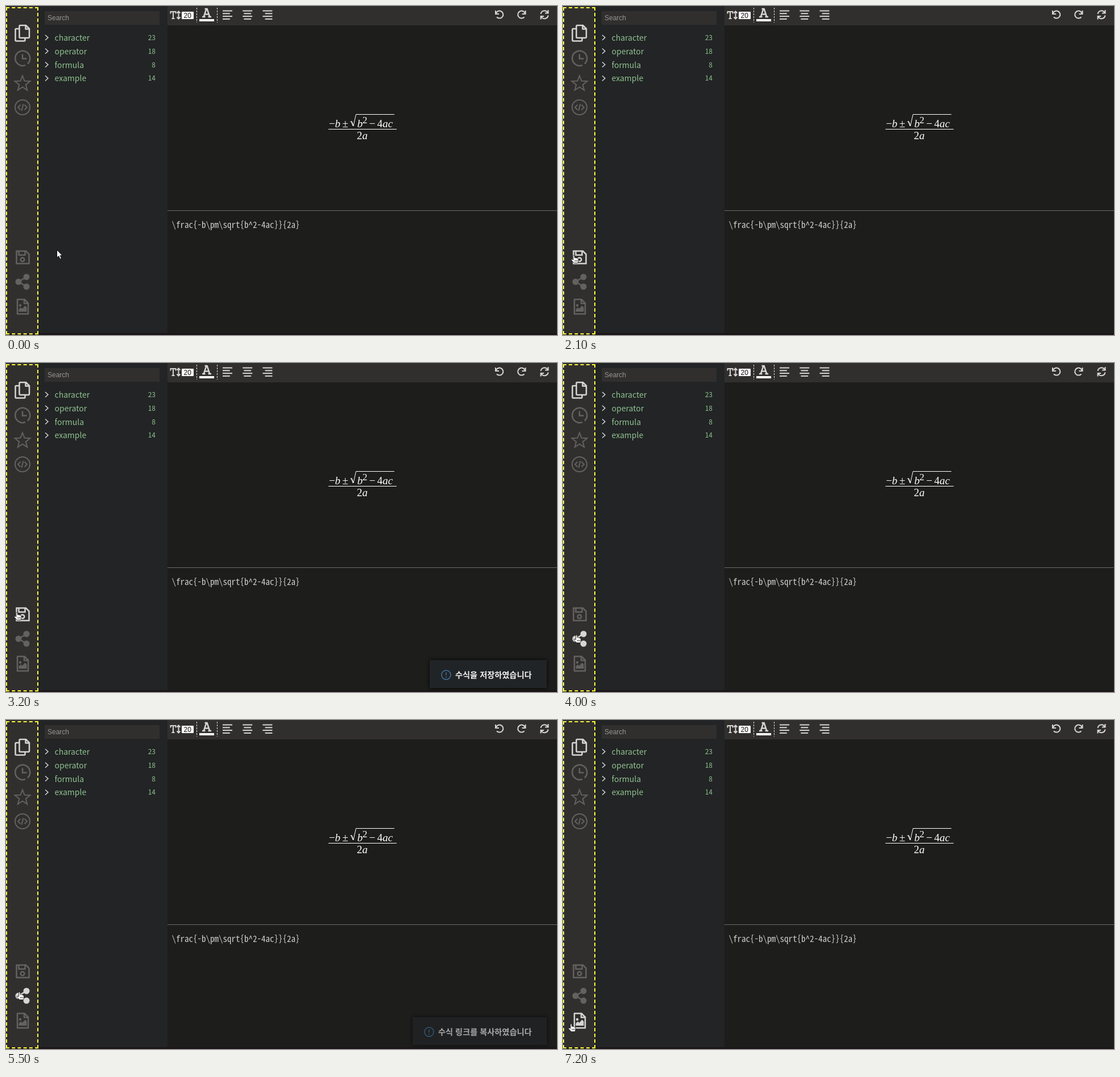
These frames come from a looping animation (969x578 px, 8 s). An HTML page:

```html
<!DOCTYPE html>
<html lang="ko">
<head>
<meta charset="utf-8">
<title>Formula editor</title>
<style>
  html, body { margin: 0; width: 100%; height: 100%; overflow: hidden; background: #1d1d1b; }
  svg { position: absolute; left: 0; top: 0; display: block; }
  .frame {
    position: absolute; left: 0; top: 2px; width: 57px; height: 575px;
    box-sizing: border-box; border: 2px dashed #ffff35;
  }
  .cjk { font-family: 'Noto Sans CJK KR', 'Noto Sans CJK JP', 'Noto Sans', sans-serif; }
  .arial { font: 12px 'Liberation Sans', sans-serif; }
  .code { font: 15px 'Noto Sans Mono CJK KR', 'Noto Sans Mono CJK JP', 'Noto Sans Mono', monospace; fill: #d0d0ce; white-space: pre; }
  .math text { font: 19px 'Liberation Serif', serif; fill: #fff; }
  .math .i { font-style: italic; }
  .line { fill: none; stroke: currentColor; stroke-width: 2.5; }
  .thin { stroke-width: 2; }
  .fill { fill: currentColor; }
  .dim { color: #64615f; }
  .on { color: #d6d5d4; }
  .body { fill: #212427; filter: drop-shadow(0 0 3px rgba(0, 0, 0, .95)); }
  .msg { font-size: 14.2px; font-weight: 700; fill: #f0f0f0; }
</style>
</head>
<body>
<svg width="969" height="578" viewBox="0 0 969 578">
  <rect width="969" height="578" fill="#1d1d1b"/>
  <rect x="57" width="227" height="578" fill="#222425"/>
  <rect width="57" height="578" fill="#312f2e"/>
  <rect x="284" width="685" height="34" fill="#312f2e"/>
  <rect x="284" y="359" width="685" height="1" fill="#6b6a68"/>
  <rect y="575" width="969" height="3" fill="#1c1418"/>

  <rect x="68" y="9" width="202" height="24" fill="#312f2e"/>
  <text class="arial" x="73" y="25" fill="#979593">Search</text>
  <g id="list" class="cjk" fill="#90c190"></g>

  <g class="on">
    <path class="line thin" d="M289.5 13.5V10h9v3.500M294 10v12M291.5 22h5M303.5 11v10M300.5 12.5l3-3 3 3M300.5 19.5l3 3 3-3"/>
    <rect x="309" y="10" width="21" height="13" rx="1" fill="#fff"/>
    <text class="arial" x="312.5" y="21" fill="#111">20</text>
    <path d="M335.5 3v26M371.5 3v26" stroke="#e8e8e8" stroke-dasharray="3 2"/>
    <path class="line" d="M347.8 19L352.4 5h1.200L358.200 19M349.5 14.500h7M345 19h5.500M355.500 19h5.500M349.500 5h4"/>
    <rect x="340" y="23" width="26" height="4" fill="#fff"/>
    <g id="align" class="fill"></g>
    <g class="line thin">
      <path d="M861 8v6h6M861.5 13.5a6.5 6.5 0 1 1 1.5 6"/>
      <path d="M913.5 8v6h-6M913 13.5a6.5 6.5 0 1 0-1.5 6"/>
      <path d="M940.5 14a6.5 6.5 0 0 1 12-2.5M953.5 7v5.5h-5.5M953.5 16.5a6.5 6.5 0 0 1-12 2.5M940.5 23.5v-5.5h5.5"/>
    </g>
  </g>

  <g class="math">
    <text x="568" y="213">−</text>
    <text class="i" x="578.5" y="213">b</text>
    <text x="591.5" y="213">±</text>
    <path d="M605.5 203.5l2-1 3.3 8.5 4.700-20.500H683" fill="none" stroke="#fff"/>
    <path d="M607.7 203l2.900 7.500" stroke="#fff" stroke-width="1.6"/>
    <text class="i" x="617.8" y="213">b</text>
    <text x="626.8" y="206" style="font-size:17.5px">2</text>
    <text x="638.8" y="213">−</text>
    <text x="652.8" y="213">4<tspan class="i">ac</tspan></text>
    <rect x="567" y="216" width="120" height="1" fill="#fff"/>
    <text x="617" y="234">2<tspan class="i">a</tspan></text>
  </g>
  <text class="code" x="291.5" y="390">\frac{-b\pm\sqrt{b^2-4ac}}{2a}</text>

  <path class="line on" stroke-linejoin="round" d="M25 34h10l6 6v14.5a1.5 1.5 0 0 1-1.5 1.5H25a1.5 1.5 0 0 1-1.5-1.5v-19A1.5 1.5 0 0 1 25 34zM34.5 34v6.5H41M23.5 40H18a1.5 1.5 0 0 0-1.5 1.5V60a1.5 1.5 0 0 0 1.5 1.5h14a1.5 1.5 0 0 0 1.5-1.5v-4"/>
  <g class="dim">
    <path class="line" d="M38 101.5a13 13 0 1 0-4 2.5M38 101.500a13 13 0 0 0 3-4M29 84.5v8h7.5"/>
    <path id="star" class="line thin"/>
    <circle class="line thin" cx="29" cy="178" r="13"/>
    <path class="line thin" d="M25.5 173.5l-4.5 4.5 4.5 4.5M32.5 173.5l4.5 4.5-4.5 4.5M30.5 172l-3 12"/>
  </g>
  <g id="save" class="dim">
    <path class="line" d="M18.5 430.5H35l5.5 5.5v16.5h-22zM22.5 431v6.5h11V431"/>
    <circle class="line" cx="29" cy="445.5" r="3.3"/>
  </g>
  <g id="share" class="dim">
    <path class="line" d="M36 476l-14 8.500 14 8.500"/>
    <g class="fill">
      <circle cx="36" cy="476" r="5.5"/><circle cx="22" cy="484.5" r="5.5"/><circle cx="36" cy="493" r="5.5"/>
    </g>
  </g>
  <g id="image" class="dim">
    <path class="line" stroke-linejoin="round" d="M20 515.5h12.5l6.5 6.5v19H20zM32 515.5v7h7"/>
    <path class="fill" d="M22.5 537v-4l3.5-3.5 2.5 2.5 5-5.5 3 3v7.500z"/>
    <circle class="fill" cx="25" cy="526" r="2.2"/>
  </g>
</svg>
<div class="frame"></div>
<svg width="969" height="578" viewBox="0 0 969 578">
  <g id="toasts" class="cjk"></g>
  <g id="tips" class="cjk"></g>
  <path id="arrow" d="M.5 .5V14l3.2-2.8 2.3 5.3 2.5-1.1-2.3-5.1H10z" fill="#fff" stroke="#111"/>
  <path id="hand" d="M4 9V2Q4 .7 5.2 .7T6.5 2V5.2Q8.5 4.6 9 5.7 10.8 5.3 11.2 6.5 13 6.3 13 8V11Q13 12.5 12 14.5H5.5L1 10Q.2 8.7 1.3 8 2.5 7.7 4 9zM7 9.500v2.500M9 9.500v2.500M11 9.500v2.500" fill="#fff" stroke="#111" stroke-width=".8"/>
</svg>
<script>
  const LOOP = 8000, STEP = 100;
  const $ = id => document.getElementById(id);

  // static repeats
  $('list').innerHTML = [['character', 23], ['operator', 18], ['formula', 8], ['example', 14]]
    .map(([name, count], i) => {
      const y = 61 + i * 23.8;
      return `<path d="M69 ${y - 10}l5 4.5-5 4.5" fill="none" stroke="#dcdcdc" stroke-width="1.4"/>
        <text x="85.5" y="${y}" font-size="14">${name}</text>
        <text x="263" y="${y - 1}" font-size="12" text-anchor="end">${count}</text>`;
    }).join('');

  $('align').innerHTML = [0, .5, 1].map((side, n) =>
    [17, 12.8, 17, 12.8].map((w, i) =>
      `<rect x="${381 + n * 35.2 + (17 - w) * side}" y="${7.5 + i * 4.8}" width="${w}" height="2"/>`
    ).join('')).join('');

  const points = Array.from({ length: 10 }, (_, i) => {
    const a = i * Math.PI / 5, r = i % 2 ? 6 : 14;
    return `${29 + r * Math.sin(a)} ${136.5 - r * Math.cos(a)}`;
  });
  $('star').setAttribute('d', `M${points.join('L')}z`);

  // notifications: resting offset REST, nudged back to 0 while leaving
  const REST = 4;
  const toasts = [
    { x: 745, w: 206, text: '수식을 저장하였습니다', from: 2200, to: 3200 },
    { x: 711, w: 236, text: '수식 링크를 복사하였습니다', from: 5200, to: 6100 }
  ];
  $('toasts').innerHTML = toasts.map(({ x, w, text }) => `<g>
    <rect class="body" x="${x}" y="522" width="${w}" height="49"/>
    <g fill="none" stroke="#41729f" stroke-width="1.5">
      <circle cx="${x + 29}" cy="548" r="8"/>
      <path d="M${x + 29} 543.5v5.5m0 2v1.8"/>
    </g>
    <text class="msg" x="${x + 45}" y="553">${text}</text></g>`).join('');

  const tips = [
    { x: 27, y: 452, w: 91, text: '저장하기', from: 1300, to: 2100 },
    { x: 32, y: 488, w: 66, text: '공유', from: 4400, to: 5000 }
  ];
  $('tips').innerHTML = tips.map(({ x, y, w, text }) => `<g>
    <rect x="${x}" y="${y}" width="${w}" height="39" rx="3" fill="#222" opacity=".9"/>
    <text x="${x + w / 2}" y="${y + 24}" font-size="13" fill="#fff" text-anchor="middle">${text}</text></g>`).join('');

  // time, x, y, pointer, hovered icon
  const moves = [
    [0, 89, 428, 'arrow'], [200, 82, 430, 'arrow'], [300, 69, 437, 'arrow'], [400, 62, 440, 'arrow'],
    [600, 32, 438, 'hand', 'save'], [700, 14, 437, 'hand', 'save'],
    [3500, 15, 446, 'hand', 'save'], [3600, 17, 463, 'hand', 'share'],
    [3700, 19, 474, 'hand', 'share'], [3800, 19.5, 476.5, 'hand', 'share'],
    [4000, 18.5, 477, 'hand', 'share'],
    [7000, 15, 495, 'hand', 'share'], [7100, 10, 524, 'hand', 'image'], [7200, 9, 533, 'hand', 'image']
  ];

  function alpha(t, { from, to }) {
    if (t < from) return 0;
    if (t < to) return Math.min(1, (Math.floor((t - from) / STEP) + 1) / 6);
    return Math.max(0, 1 - Math.floor((t - to) / STEP) / 3);
  }

  function draw(t) {
    const [, x, y, pointer, hover] = moves.filter(m => m[0] <= t).pop();
    for (const id of ['arrow', 'hand']) {
      $(id).style.display = id === pointer ? '' : 'none';
      $(id).setAttribute('transform', `translate(${x} ${y})`);
    }
    for (const id of ['save', 'share', 'image'])
      $(id).setAttribute('class', id === hover ? 'on' : 'dim');
    toasts.forEach((toast, i) => {
      const g = $('toasts').children[i];
      g.setAttribute('opacity', alpha(t, toast));
      g.setAttribute('transform', `translate(${t < toast.to ? REST : 0})`);
    });
    tips.forEach((tip, i) => {
      $('tips').children[i].style.display = t >= tip.from && t < tip.to ? '' : 'none';
    });
  }

  const start = performance.now();
  function tick() {
    draw((performance.now() - start) % LOOP);
    requestAnimationFrame(tick);
  }
  tick();
</script>
</body>
</html>
```
